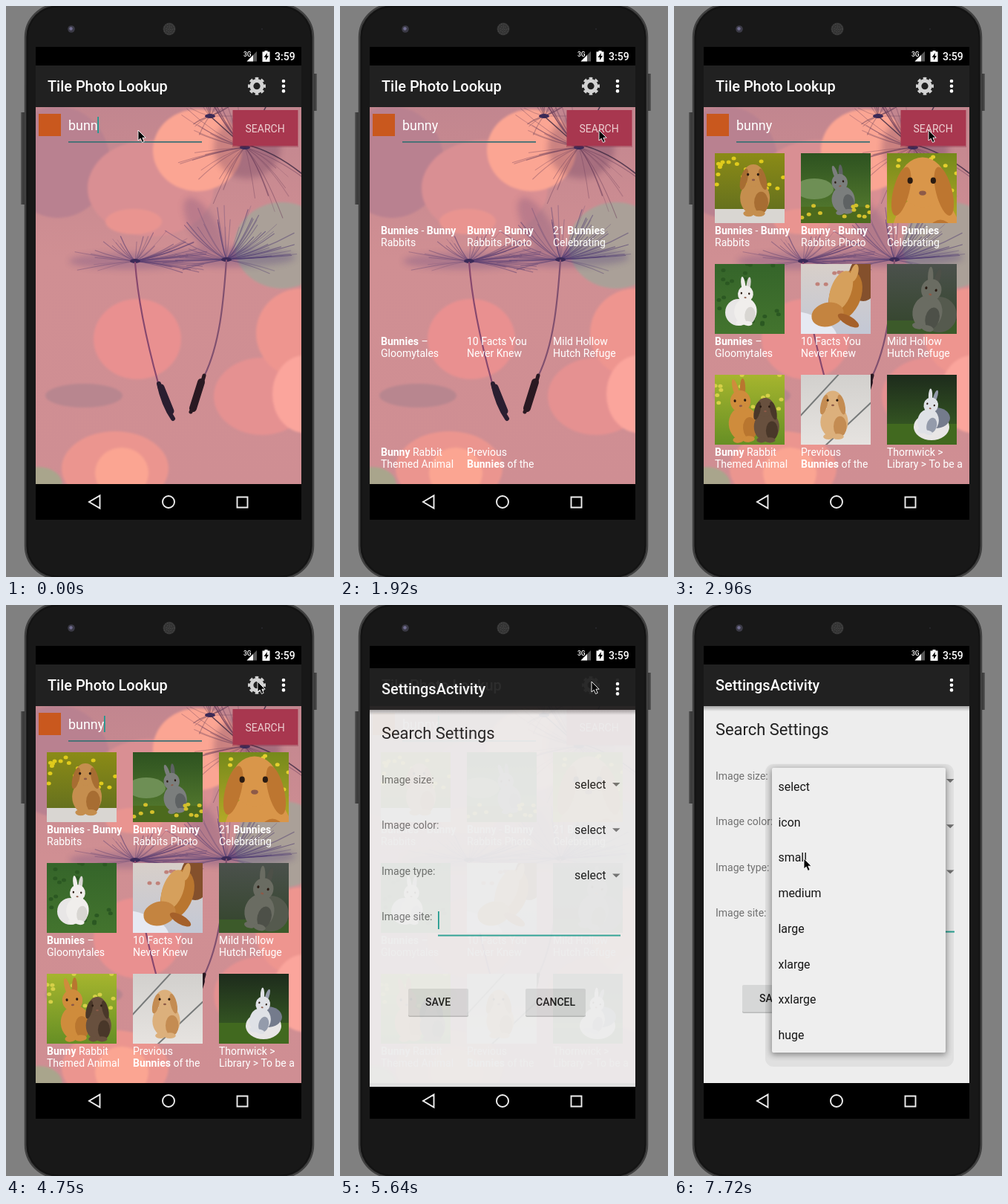
Recreate the animation shown at these times as an HTML page. Size 442 by 768 pixels, loop 8 s.

```html
<!DOCTYPE html>
<html lang="en">
<head>
<meta charset="utf-8">
<title>Image search demo</title>
<style>
html, body { margin: 0; width: 100%; height: 100%; overflow: hidden; background: #808080; }
svg { display: block; }
text { font-family: Roboto, sans-serif; font-size: 14px; white-space: pre; }
.bold { font-weight: 700; }
.medium { font-weight: 500; }
.bar { font-size: 19.9px; font-weight: 500; fill: #fff; }
</style>
</head>
<body>
<svg id="stage" width="100%" height="100%" viewBox="0 0 442 768">
  <defs>
    <filter id="soft"><feGaussianBlur stdDeviation="1.6"/></filter>
    <filter id="shade" x="-20%" y="-20%" width="140%" height="140%"><feGaussianBlur stdDeviation="4"/></filter>
    <linearGradient id="pink" x2="0" y2="1">
      <stop stop-color="#c2868f"/><stop offset=".4" stop-color="#d08f93"/><stop offset="1" stop-color="#cf8e93"/>
    </linearGradient>
    <linearGradient id="drop" x2="0" y2="1">
      <stop stop-color="#000" stop-opacity=".3"/><stop offset="1" stop-color="#000" stop-opacity="0"/>
    </linearGradient>
    <clipPath id="photoClip"><path d="M40 136h358v507H40z"/></clipPath>
    <clipPath id="barClip"><path d="M40 80h358v56H40z"/></clipPath>
    <g id="dots" fill="#fff"><circle cx="374" cy="101" r="2.3"/><circle cx="374" cy="107.700" r="2.3"/><circle cx="374" cy="114.400" r="2.3"/></g>
  </defs>

  <!-- phone -->
  <path fill="#808080" d="M0 0h442v768H0z"/>
  <path fill="#3c3c3c" d="M20 143h6v124h-6zM414 91h5v50h-5z"/>
  <path fill="#555" d="M20 143h1.500v124h-1.500zM417.500 91h1.500v50h-1.500z"/>
  <rect x="26" y="-2" width="388" height="772" rx="44" fill="#181818" stroke="#404040" stroke-width="2.500"/>
  <rect x="29" y="1" width="382" height="766" rx="41" fill="none" stroke="#101010"/>
  <circle cx="88" cy="31" r="4.800" fill="#3b3a46"/><circle cx="87.500" cy="30.500" r="2.200" fill="#716d90"/>
  <circle cx="220" cy="31" r="8.500" fill="#333"/>
  <g fill="none" stroke="#535353" stroke-dasharray="1.500 1.500"><circle cx="220" cy="31" r="7"/><circle cx="220" cy="31" r="4"/><circle cx="220" cy="31" r="1.500"/></g>
  <circle cx="345" cy="31" r="1" fill="#292930"/>
  <path d="M40 55h358v636H40z"/>

  <!-- search screen -->
  <path fill="#212121" d="M40 80h358v56H40z"/>
  <text x="56" y="115" class="bar">Tile Photo Lookup</text>
  <g fill="none" stroke="#d2d2d2">
    <circle cx="338" cy="107.700" r="7.100" stroke-width="5"/>
    <circle cx="338" cy="107.700" r="10.500" stroke-width="3" pathLength="16" stroke-dasharray="1.100 .9" stroke-dashoffset=".55"/>
  </g>
  <use href="#dots"/>
  <circle id="gearTap" cx="338" cy="108" r="33" fill="#fff" clip-path="url(#barClip)"/>
  <g clip-path="url(#photoClip)">
    <path fill="url(#pink)" d="M40 136h358v507H40z"/>
    <g id="bokeh" filter="url(#soft)"></g>
    <g id="haze" filter="url(#shade)" opacity=".32"></g>
    <g id="flowers" fill="none" stroke-linecap="round"></g>
  </g>
  <path fill="#c9581e" d="M44 145h30v30H44z"/>
  <text id="query" x="84" y="167" fill="#fff" style="font-size:17.900px"></text>
  <path fill="#3b7074" d="M84 182h180v1.700H84z"/>
  <path id="caret" fill="#189a91" d="M0 149h1.700v22H0z"/>
  <path fill="#8d2a42" opacity=".35" d="M305 188h89v2h-89z"/>
  <path fill="#a8374f" d="M305.500 140h88v48h-88z"/>
  <path id="searchTap" fill="#fff" d="M305.500 140h88v48h-88z"/>
  <text x="322.500" y="169.500" fill="#edd0d2">SEARCH</text>
  <g id="grid"></g>

  <!-- settings screen, with its own status bar ground -->
  <g id="settings">
    <path d="M40 55h358v25H40z"/>
    <path fill="#ededed" d="M40 80h358v563H40z"/>
    <path fill="url(#drop)" d="M40 136h358v7H40z"/>
    <path fill="#212121" d="M40 80h358v56H40z"/>
    <text x="56" y="115" class="bar">SettingsActivity</text>
    <use href="#dots"/>
    <text x="56" y="175" fill="#212121" style="font-size:21.900px">Search Settings</text>
    <g id="fields"></g>
    <path fill="#2aa596" d="M132 438.500h246v2H132z"/>
    <path id="siteCaret" fill="#189a91" d="M132 407h1.700v24H132z"/>
  </g>

  <!-- system bars -->
  <g fill="#fff">
    <text x="320" y="68" class="medium" style="font-size:8.500px">3G</text>
    <path d="M338 61v13.500h-13.500z" opacity=".35"/><path d="M333 66v8.500h-8.500z"/>
    <path d="M348.500 60h4v1.500h3V75h-10V61.500h3z"/><path fill="#000" d="M352 63l-4.500 6h2.500v4l4-6h-2.500z"/>
    <text x="362" y="73" class="medium">3:59</text>
  </g>
  <g fill="none" stroke="#eee" stroke-width="1.900">
    <path d="M126.500 658.500v17L112 667zM311.500 660.500h14v14h-14z"/><circle cx="219" cy="667" r="8"/>
  </g>

  <g id="popup">
    <rect x="123" y="214" width="254" height="407" rx="11" fill="#000" opacity=".055"/>
    <rect x="131" y="221" width="236" height="384" rx="2" opacity=".4" filter="url(#shade)"/>
    <rect x="132" y="219" width="234" height="383" rx="2" fill="#eee"/>
    <g id="items" fill="#161616"></g>
  </g>

  <path id="mouse" d="M0 0v14l3.200-2.800 2.300 5.300 2.700-1.200-2.300-5.100h4.300z" stroke="#fff" stroke-width=".9"/>
</svg>

<script>
const el = id => document.getElementById(id);
const clamp = v => Math.max(0, Math.min(1, v));
const text = (x, y, str, attrs = "") => `<text x="${x}" y="${y}" ${attrs}>${str}</text>`;
const oval = (x, y, rx, ry, fill, turn = 0) =>
  `<ellipse cx="${x}" cy="${y}" rx="${rx}" ry="${ry}" fill="${fill}" transform="rotate(${turn} ${x} ${y})"/>`;
const line = (d, color, width, opacity = 1) =>
  `<path d="${d}" stroke="${color}" stroke-width="${width}" opacity="${opacity}"/>`;

let seed = 7;
const rand = () => (seed = seed * 16807 % 2147483647) / 2147483647;

// background photo: blurred lights and dandelion seeds
el("bokeh").innerHTML = [
  [70, 210, 70, 75, "#b98190"], [195, 245, 85, 65, "#d98f93"], [258, 194, 60, 55, "#fba593"],
  [172, 290, 38, 17, "#e99490"], [372, 322, 64, 58, "#aaa098"], [177, 448, 59, 54, "#e99090"],
  [345, 525, 65, 52, "#e59191"], [398, 440, 61, 60, "#ee958f"], [402, 522, 43, 52, "#fba59c"],
  [105, 524, 52, 16, "#b8868f"], [147, 622, 72, 50, "#eb958f"], [156, 628, 36, 34, "#fba592"],
  [44, 644, 32, 24, "#a9a58c"]
].map(a => oval(...a)).join("");
el("haze").innerHTML = oval(170, 343, 85, 11, "#674b80") + oval(300, 338, 90, 13, "#54407a") +
  oval(268, 300, 18, 48, "#7a527c", -30) + oval(325, 190, 45, 42, "#62385a");

// filaments spread from a centre, longer sideways than upwards
function fan(x, y, count, from, to, tall, wide, color) {
  let out = "";
  for (let i = 0; i < count; i++) {
    const a = (from + (to - from) * rand()) * Math.PI / 180;
    const r = .5 + .5 * rand();
    const dx = Math.cos(a) * wide * r, dy = Math.sin(a) * tall * r;
    out += line(`M${x} ${y}q${dx * .5} ${dy * .3} ${dx} ${dy}`, color, .7 + rand() * .7, .25 + rand() * .35);
  }
  return out + oval(x, y, 7, 3, "#3b2a58");
}
el("flowers").innerHTML =
  fan(275, 148, 16, 0, 360, 38, 38, "#55344f") + fan(322, 190, 34, 10, 260, 115, 95, "#6b3f5c") +
  fan(174, 343, 46, 150, 390, 46, 102, "#5c4072") + fan(297, 341, 50, 155, 385, 78, 105, "#4f3b72") +
  line("M275 148L322 190M322 186Q360 195 398 225M322 190L350 136", "#3d2942", 1.600, .8) +
  line("M174 345C178 400 192 460 205 507", "#87486e", 2.200) +
  line("M297 342C293 400 288 455 267 498", "#80506f", 2.200) +
  line("M206 508Q212 536 225 555", "#2a1e30", 6) + line("M209 513L222 545", "#2a1e30", 9) +
  line("M267 497Q258 530 249 546", "#2a1922", 5) + line("M263 506L252 541", "#2a1922", 10);

// result pictures: simple rabbits on soft fields
function bunny(x, y, size, coat, shade, lop, turn = 0) {
  const ears = lop
    ? oval(-12, -2, 4.500, 14, shade, 14) + oval(12, -2, 4.500, 14, shade, -14)
    : oval(-5, -23, 3.500, 13, coat, -12) + oval(4, -23, 3.500, 13, shade, 4);
  return `<g transform="translate(${x} ${y}) rotate(${turn}) scale(${size})">` +
    oval(2, 22, 19, 22, coat) + oval(10, 28, 9, 14, shade) + (lop ? "" : ears) +
    oval(0, -7, 13, 14, coat) + (lop ? ears : "") + oval(-6, 42, 7, 4, coat) + oval(7, 42, 8, 4, coat) +
    oval(-7, -8, 1.500, 1.800, "#2a1b12") + oval(6, -8, 1.500, 1.800, "#2a1b12") + oval(0, -1, 2, 1.300, "#8d5a48") + "</g>";
}
function specks(count, color, top, height) {
  let out = "";
  while (count--) out += oval(rand() * 94, top + rand() * height, 3, 2.500, color);
  return out;
}
const band = (y, color) => `<path fill="${color}" d="M0 ${y}h94v94H0z"/>`;
const tan = "#d6a05c", rust = "#b9762f", snow = "#e8e6e6";
const tiles = [
  ["#8b8b16", "#5d6b20", specks(22, "#e0cb1c", 0, 50) + band(75, "#d9d6d2") + bunny(52, 37, 1.050, "#c58e4e", "#a76d32", 1)],
  ["#2d5220", "#5a7f30", oval(18, 48, 26, 14, "#6e8f55") + band(72, "#4c6a1d") + bunny(53, 45, .82, "#7b7e7d", "#5e6263", 0, -8) + specks(12, "#d4c02c", 70, 20)],
  ["#75891b", "#b3a927", specks(14, "#e4cf2e", 0, 50) + bunny(48, 56, 2.400, "#d9964a", "#bd7630", 1)],
  ["#35652a", "#43742e", specks(20, "#2b5822", 0, 94) + oval(32, 65, 18, 18, snow) + bunny(41, 46, .8, "#f0eeec", "#d8d6d2", 0, 4)],
  ["#d8cfc9", "#c3c8d5", specks(12, "#c0827a", 0, 28) + oval(84, 20, 20, 30, "#84502c") + oval(10, 84, 40, 16, "#e6e9f2", 20) +
    oval(60, 42, 21, 34, rust, 20) + oval(54, 36, 14, 28, tan, 20) + oval(36, 68, 22, 16, "#c48440", -15) + oval(64, 76, 16, 6, "#a5602a", 30) + oval(72, 12, 5, 12, tan, 15)],
  ["#4b514c", "#33452b", band(76, "#3c5a2a") + oval(70, 68, 24, 24, "#555a4e") + bunny(58, 42, 1.050, "#6a6c62", "#4d5048", 0, 14)],
  ["#a6b52e", "#668f25", specks(16, "#d6d048", 0, 50) + bunny(35, 43, 1.050, "#cf8c3c", rust, 0, -4) + bunny(68, 50, .9, "#68503e", "#493729", 1)],
  ["#d2d0cd", "#e6e3e0", '<path d="M-5 60L55-5M30 98L98 34" stroke="#777a7a" stroke-width="2"/>' + bunny(43, 42, .98, "#dcb07c", "#c48c52", 1)],
  ["#1d2b1c", "#3c6424", band(66, "#41691f") + oval(60, 70, 24, 18, snow) + oval(65, 58, 20, 14, "#747b8c") + bunny(58, 46, .75, "#dfe1e6", "#949bab", 0, 14)]
];
const b = str => `<tspan class="bold">${str}</tspan>`;
const titles = [
  [b("Bunnies") + " - " + b("Bunny"), "Rabbits"], [b("Bunny") + " - " + b("Bunny"), "Rabbits Photo"],
  ["21 " + b("Bunnies"), "Celebrating"], [b("Bunnies") + " –", "Gloomytales"],
  ["10 Facts You", "Never Knew"], ["Mild Hollow", "Hutch Refuge"],
  [b("Bunny") + " Rabbit", "Themed Animal"], ["Previous", b("Bunnies") + " of the"],
  ["Thornwick &gt;", "Library &gt; To be a"]
];
el("grid").innerHTML = tiles.map(([top, low, art], i) => {
  const x = 55 + i % 3 * 116, y = 198 + Math.floor(i / 3) * 149;
  return `<g id="title${i}" fill="#fff">${titles[i].map((s, k) => text(x, y + 109 + k * 16.300, s)).join("")}</g>
    <svg id="tile${i}" x="${x}" y="${y}" width="94" height="94" viewBox="0 0 94 94">
    <linearGradient id="field${i}" x2="0" y2="1"><stop stop-color="${top}"/><stop offset="1" stop-color="${low}"/></linearGradient>
    <path fill="url(#field${i})" d="M0 0h94v94H0z"/>${art}</svg>`;
}).join("");

// settings form and drop-down list
el("fields").innerHTML = ["size", "color", "type", "site"].map((name, i) => {
  const y = 235 + i * 61.300;
  const pick = text(316, y + 6.500, "select", 'fill="#1c1c1c" style="font-size:15.900px"') +
    `<path fill="#757575" d="M367 ${y - 1}h10.500l-5.250 5z"/>`;
  return text(56, y, `Image ${name}:`, 'fill="#717171"') + (i < 3 ? pick : "");
}).join("") + [["SAVE", 92, 115], ["CANCEL", 250, 264]].map(([name, x, tx]) =>
  `<rect x="${x}" y="512" width="81" height="37" rx="2" fill="#b9baba"/>
   <rect x="${x}" y="511" width="81" height="36.500" rx="2" fill="#d6d7d7"/>` +
  text(tx, 534, name, 'class="medium" fill="#1c1c1c"')).join("");
el("items").innerHTML = ["select", "icon", "small", "medium", "large", "xlarge", "xxlarge", "huge"]
  .map((s, i) => text(140.500, 250 + i * 47.700, s, 'style="font-size:15.900px"')).join("");

// pointer stops: step, x, y
const path = [
  [0, 178, 167], [2, 178, 167], [3, 222, 178], [4, 300, 181], [5, 349, 167], [16, 349, 167],
  [18, 343, 167], [22, 343, 167], [25, 339, 103], [40, 339, 103], [43, 343, 258],
  [45, 329, 242], [48, 329, 242], [52, 175, 341], [99, 175, 341]
];
function pointer(n) {
  const i = path.findIndex(p => p[0] > n);
  const [n0, x0, y0] = path[i - 1], [n1, x1, y1] = path[i];
  const k = (n - n0) / (n1 - n0);
  return `translate(${x0 + (x1 - x0) * k} ${y0 + (y1 - y0) * k})`;
}

const blinks = [5, 8, 11, 15, 18, 21, 24, 27, 42, 45, 48];
const show = (id, amount) => el(id).setAttribute("opacity", clamp(amount));

function draw(ms) {
  const n = Math.ceil((Math.floor(ms / 10) + 1) / 14.847) - 1;
  const caretOn = blinks.filter(s => s <= n).length % 2 === 0;

  el("query").textContent = n < 1 ? "bunn" : "bunny";
  el("caret").setAttribute("transform", `translate(${n < 1 ? 123.300 : 132} 0)`);
  show("caret", caretOn);
  show("siteCaret", caretOn);
  show("searchTap", n === 7 ? .12 : n === 8 ? .22 : 0);
  show("gearTap", n === 29 || n === 30 ? .2 : n === 31 ? .1 : 0);

  tiles.forEach((_, i) => {
    show("title" + i, n >= (i < 8 ? 12 : 14));
    show("tile" + i, (n - 13 - i / 2) / 2);
  });

  const rise = n < 38 ? 27.500 : n < 39 ? 5 : 0;
  el("settings").setAttribute("transform", `translate(0 ${rise})`);
  show("settings", n < 37 ? 0 : n < 38 ? .6 : n < 39 ? .95 : 1);
  show("popup", (n - 46) / 2);
  show("items", (n - 47) / 2);
  el("mouse").setAttribute("transform", pointer(n));
}

function tick() {
  draw(performance.now() % 8000);
  requestAnimationFrame(tick);
}
tick();
</script>
</body>
</html>
```
